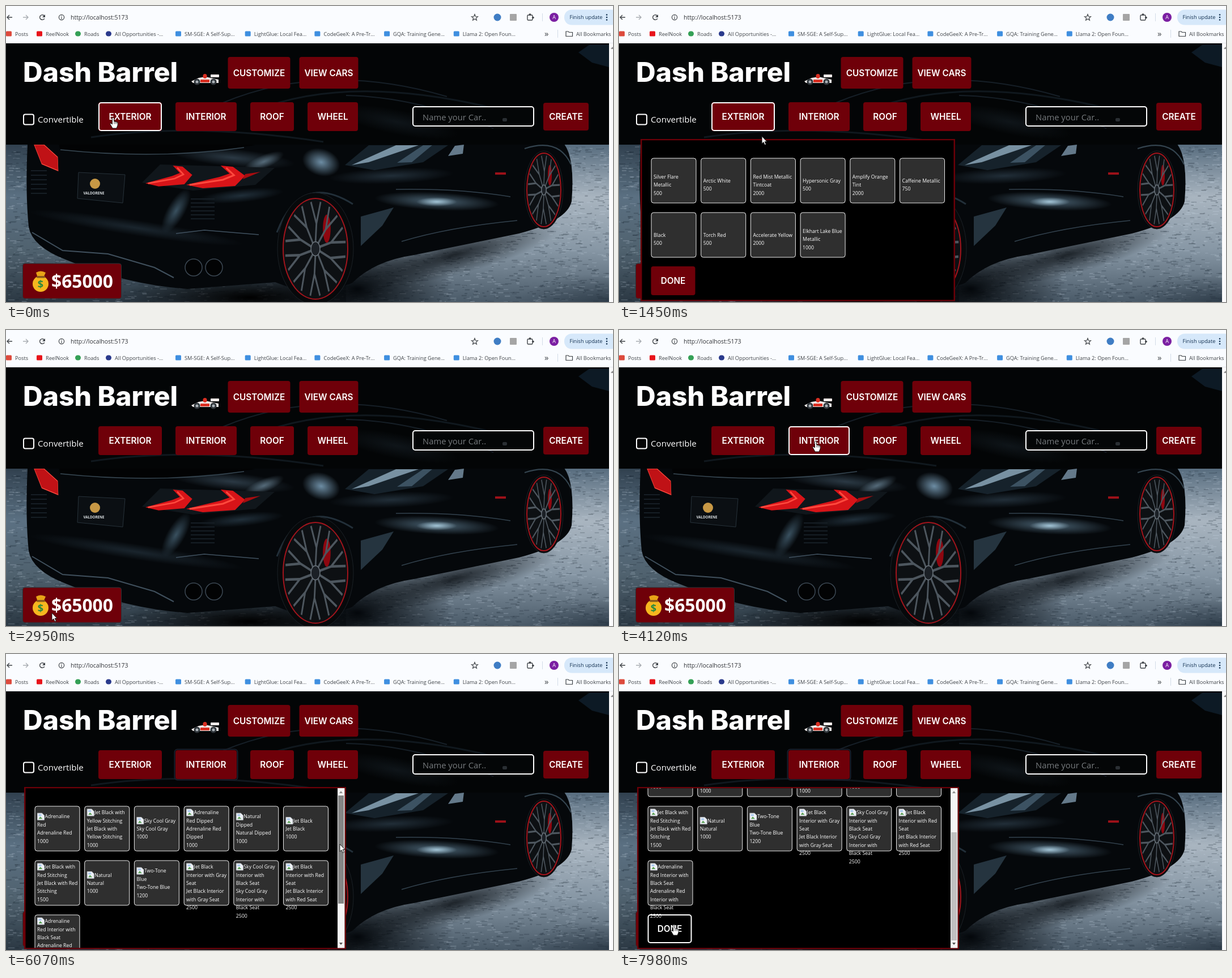
Write an HTML page with a canvas that moves like this. It is 1071x523 px and loops after 8 s.

```html
<!DOCTYPE html>
<html lang="en">
<head>
<meta charset="utf-8">
<title>Car customizer</title>
<style>
html, body { margin: 0; width: 100%; height: 100%; overflow: hidden; background: #000; }
canvas { display: block; width: 1071px; height: 523px; }
</style>
</head>
<body>
<canvas id="stage" width="1071" height="523"></canvas>
<script>
const W = 1071, H = 523, LOOP = 8000, STEP = 120;
const RED = '#6f0009', INK = '#3f4347';
const UI = '"Open Sans", "Noto Sans", sans-serif';
const HEAD = 'Inter, Roboto, sans-serif';
const stage = document.getElementById('stage').getContext('2d');
let c = stage;

// ---------- drawing helpers ----------
function text(s, x, y, size, color, font = UI, weight = 400, align = 'left') {
  c.font = `${weight} ${size}px ${font}`;
  c.fillStyle = color;
  c.textAlign = align;
  c.fillText(s, x, y);
}
function paint(fill, stroke, lw) {
  if (fill) { c.fillStyle = fill; c.fill(); }
  if (stroke) { c.strokeStyle = stroke; c.lineWidth = lw; c.stroke(); }
}
function box(x, y, w, h, r, fill, stroke, lw = 1) {
  c.beginPath(); c.roundRect(x, y, w, h, r); paint(fill, stroke, lw);
}
function disc(x, y, rx, ry, fill, stroke, lw = 1) {
  c.beginPath(); c.ellipse(x, y, rx, ry, 0, 0, 7); paint(fill, stroke, lw);
}
function shape(path, fill, stroke, lw = 1) {
  const p = new Path2D(path);
  if (fill) { c.fillStyle = fill; c.fill(p); }
  if (stroke) { c.strokeStyle = stroke; c.lineWidth = lw; c.stroke(p); }
}
function glow(x, y, rx, ry, rgb, a, turn = 0) {
  c.save();
  c.translate(x, y); c.rotate(turn); c.scale(rx, ry);
  const g = c.createRadialGradient(0, 0, 0, 0, 0, 1);
  g.addColorStop(0, `rgba(${rgb},${a})`);
  g.addColorStop(1, `rgba(${rgb},0)`);
  c.fillStyle = g;
  c.fillRect(-1, -1, 2, 2);
  c.restore();
}
function ramp(x0, y0, x1, y1, ...colors) {
  const g = c.createLinearGradient(x0, y0, x1, y1);
  colors.forEach((k, i) => g.addColorStop(i / (colors.length - 1), k));
  return g;
}
function at(x, y, sx, sy, fn) {
  c.save(); c.translate(x, y); c.scale(sx, sy); fn(); c.restore();
}

// ---------- background photo ----------
function floor() {
  c.fillStyle = ramp(0, 245, 0, 523, '#31414f', '#5b7082', '#50626f', '#2b3843');
  c.fillRect(0, 66, 600, 457);
  c.fillStyle = ramp(0, 245, 0, 523, '#586d7f', '#a9b5c0', '#8797a5', '#4a5a68');
  c.fillRect(600, 66, 464, 457);
  let seed = 77;
  const rnd = () => (seed = seed * 16807 % 2147483647) / 2147483647;
  for (let i = 0; i < 4500; i++) {
    c.fillStyle = rnd() < .55 ? 'rgba(22,34,46,.25)' : 'rgba(200,214,226,.22)';
    c.fillRect(rnd() * 1064, 248 + rnd() * 275, 2 + rnd() * 10, 1 + rnd() * 1.2);
  }
  glow(620, 500, 170, 90, '4,8,12', 1);
  glow(790, 440, 190, 36, '4,8,12', .8, -.25);
  glow(430, 515, 230, 45, '0,0,0', 1);
  glow(1064, 523, 160, 50, '20,32,44', .5);
}
function wheel(x, y, rx, ry, tyre) {
  disc(x, y, rx + tyre, ry + tyre, '#07090b', '#1b2126');
  disc(x, y, rx, ry, '#0d1013', '#a3141c', 2);
  disc(x + rx * .35, y - ry * .4, rx * .12, ry * .28, '#8e0710');
  at(x, y, rx, ry, () => {
    for (let i = 0; i < 10; i++) {
      c.rotate(Math.PI / 5);
      shape('M0 -.1 L.03 -.5 L-.14 -.93 M.03 -.5 L.16 -.93', null, '#4d565e', .05);
    }
  });
  disc(x, y, rx * .14, ry * .14, '#1b2026', '#6b747c', 1.5);
}
// one hooked tail lamp, drawn in a 100 x 40 cell
function lamp(x, y, sx, sy) {
  at(x, y, sx, sy, () => {
    shape('M0 34 L60 20 L78 14 L62 0 L84 2 L106 18 L88 36 L30 40 Z', '#d81418');
    shape('M6 34 L66 25 L86 17 L72 4', null, '#ff4a3e', 3);
  });
}
function car() {
  shape(`M38 245 Q34 330 40 390 Q46 425 105 448 Q210 492 320 500 L475 488 L540 512 L610 490
    Q650 450 720 440 L905 402 Q990 380 998 345 Q1004 270 985 244 Q900 150 700 130 Q380 140 90 220 Z`, '#05080b');
  // light along deck, fender and bumper
  glow(400, 268, 110, 16, '80,105,124', .5, .1);
  glow(455, 275, 38, 12, '125,155,175', .6, -.4);
  glow(556, 276, 34, 24, '120,155,180', .9, .3);
  glow(300, 362, 44, 16, '70,98,116', .8, -1.05);
  glow(415, 335, 75, 12, '50,72,88', .6, -.1);
  glow(230, 392, 190, 14, '40,56,68', .6, .15);
  shape('M92 236 Q260 222 440 246 Q260 272 95 252 Z', '#020304');
  shape('M96 254 Q270 272 420 250', null, '#384853', 1.5);
  shape('M46 400 L100 432 L180 438 L262 462 L296 480', null, '#40505d', 2);
  shape('M300 402 L350 396 L446 404', null, '#40515f', 1.5);
  for (let i = 0; i < 6; i++) {
    c.fillStyle = '#161e25';
    c.fillRect(326, 340 + i * 7, 42, 2);
    c.fillRect(44, 290 + i * 8, 28, 2);
  }
  for (const x of [331, 367]) disc(x, 462, 15, 15, '#020304', '#3c4853', 1.5);
  shape('M240 312 L272 280 L474 286 L440 316 L330 326 Z', '#10161b');
  lamp(246, 282, .78, .92);
  lamp(318, 282, .98, 1);
  shape('M418 306 L422 297 L449 293 Z', '#a60d10');
  at(47, 245, .45, 1, () => shape('M6 0 L44 0 L98 22 L100 46 L36 34 Z', '#c01216', '#ff4a3e', 1.5));
  // plate
  shape('M128 294 L210 298 L206 348 L126 340 Z', '#0b0f13', '#27323a');
  disc(157, 314, 9, 9, '#c79845');
  text('VALDORENE', 155, 333, 6.2, '#d8dde0', UI, 700, 'center');
  // windows and flank
  shape('M598 281 L640 246 L780 246 L736 276 L650 290 Z', '#16222b');
  shape('M610 281 L688 246 L728 246 L640 276 Z', '#7891a2');
  shape('M690 277 L736 246 L752 246 L716 276 Z', '#3c5262');
  shape('M780 265 L792 247 L808 245 L806 261 Z', '#64798a');
  glow(680, 300, 110, 14, '48,66,80', .65, -.04);
  shape('M626 372 L684 356 L664 388 L626 424 Z', '#25343f');
  glow(760, 345, 110, 16, '90,120,140', .8, .05);
  glow(760, 346, 36, 8, '185,220,238', .8);
  shape('M688 324 Q800 322 890 337 M698 416 Q780 391 902 379', null, '#33424e', 1.5);
  c.fillStyle = '#9c1119'; c.fillRect(863, 294, 19, 4);
  shape('M915 252 Q975 232 997 280', null, '#34444f', 2);
  shape('M478 400 Q520 292 612 350', null, '#222f39', 3);
  wheel(546, 429, 57, 89, 10);
  wheel(949, 325, 30, 65, 4);
}
function photo() {
  c.save();
  c.beginPath(); c.rect(0, 66, 1064, 457); c.clip();
  floor();
  car();
  c.fillStyle = '#030506';
  c.fillRect(0, 66, 1064, 179);
  // roof line showing faintly through the header
  shape('M1010 82 L1030 68 H1064 V108 L1034 100 Z', '#0d1a25');
  shape('M380 172 Q560 96 778 160 M600 158 Q720 160 860 216', null, '#161f27', 2);
  shape('M440 185 Q600 120 850 178 M150 232 Q330 205 560 240', null, '#10181e', 3);
  glow(690, 205, 110, 22, '26,36,44', .5, .2);
  c.restore();
}

// ---------- browser frame ----------
function tab(s, x, color, round) {
  box(x, 44.5, 10, 9, round ? 5 : 1.5, color);
  text(s, x + 16, 52.5, 9.2, INK);
}
function chrome() {
  c.fillStyle = '#fafcff'; c.fillRect(0, 0, W, 66);
  c.fillStyle = '#e4e8ee'; c.fillRect(0, 65, W, 1);
  c.fillStyle = '#fbfbfc'; c.fillRect(1064, 66, 7, 457);
  shape('M1067 76 H1073 L1070 72 Z', '#8a8a8a');
  shape('M11 20 H2 M6 16 L2 20 L6 24', null, INK, 1.4);
  shape('M30 20 H39 M35 16 L39 20 L35 24', null, '#a9adb2', 1.4);
  c.beginPath(); c.arc(64, 20, 4.3, .5, 5.6); paint(null, INK, 1.5);
  shape('M69 15 V20 H64 Z', INK);
  disc(98, 20, 4.6, 4.6, null, INK, 1.2);
  shape('M98 19.5 V23 M98 17 V18.3', null, INK, 1.2);
  text('http://localhost:5173', 114, 24, 10.5, '#303236');
  c.beginPath();
  for (let i = 0; i < 10; i++) {
    const r = i % 2 ? 2.5 : 5.8, a = i * Math.PI / 5 - Math.PI / 2;
    c.lineTo(827 + r * Math.cos(a), 20.5 + r * Math.sin(a));
  }
  c.closePath(); paint(null, INK, 1.2);
  disc(867, 20, 6.5, 6.5, '#3f7dc4');
  box(889, 14, 12, 12, 1, '#a5a5a5');
  box(920, 16, 9, 9, 1.5, null, INK, 1.4);
  disc(924.5, 15, 1.8, 1.8, INK); disc(930, 20.5, 1.8, 1.8, INK);
  c.fillStyle = '#d3dce8'; c.fillRect(946, 13, 1, 14); c.fillRect(973, 42, 1, 14);
  disc(967, 20, 8, 8, '#7b1fa2');
  text('A', 967, 23.3, 9, '#fff', UI, 400, 'center');
  box(985, 6.5, 96, 27, 13, '#d6e8fa');
  text('Finish update', 994.5, 23.3, 9.2, '#123050');
  for (let i = -1; i < 2; i++) disc(1060, 20 + i * 4.5, 1.3, 1.3, '#123050');

  tab('Posts', 0, '#dd4a3c');
  tab('ReelNook', 54, '#e8131a');
  tab('Roads', 122, '#34a056', true);
  tab('All Opportunities -...', 176, '#2a3a8c', true);
  ['SM-SGE: A Self-Sup...', 'LightGlue: Local Fea...', 'CodeGeeX: A Pre-Tr...',
    'GQA: Training Gene...', 'Llama 2: Open Foun...']
    .forEach((s, i) => tab(s, 299 + i * 122.7, '#3f8fe0'));
  text('»', 950, 54, 15, INK);
  shape('M988 53.5 V45 H992 L993.5 46.5 H999.5 V53.5 Z', null, INK, 1.2);
  text('All Bookmarks', 1006, 52.5, 9.2, INK);
}

// ---------- page ----------
function button(label, [x, y, w, h], hover = false, focus = false) {
  if (focus && !hover) box(x - 1.5, y - 1.5, w + 3, h + 3, 5, null, '#1b1f2c', 2);
  box(x, y, w, h, 4, hover && !focus ? '#000' : RED);
  if (hover) box(x + 1, y + 1, w - 2, h - 2, 4, null, '#fff', 2);
  text(label, x + w / 2, y + h / 2 + 5.5, 15.3, '#fff', HEAD, 600, 'center');
}
function raceCar() {
  shape('M327 133 L340 127 L352 125 L375 130 V136 H330 Z', '#efeae8');
  box(361, 121, 15, 5, 1, '#efeae8');
  box(343, 130, 16, 5, 1, '#d92f22');
  disc(351, 124, 3.6, 4, '#d92f22');
  for (const x of [337, 366]) {
    disc(x, 134, 5.5, 5.5, '#30363b');
    disc(x, 134, 2.5, 2.5, '#a9b0b5');
  }
}
function moneyBag() {
  shape('M53 471 Q61 466 70 471 L66 480 H56 Z', '#e8a317');
  disc(61, 491, 14, 14, '#f6b71f');
  box(54, 477, 15, 3.5, 1.5, '#8a5a1c');
  text('$', 61, 497.5, 18, '#2b8a3e', UI, 700, 'center');
}
function page() {
  text('Dash Barrel', 30, 134, 48, '#fff', HEAD, 800);
  raceCar();
  button('CUSTOMIZE', [391.5, 90, 110, 56]);
  button('VIEW CARS', [517.5, 90, 104, 56]);
  button('ROOF', [431, 170, 77, 51]);
  button('WHEEL', [532, 170, 89, 51]);
  button('CREATE', [948, 171, 80, 49]);
  box(31, 191.5, 18, 18, 3, '#050505', '#fff', 2);
  text('Convertible', 56, 205.5, 15.1, '#fff');
  box(718, 178, 213, 34, 4, '#040607', '#fff', 2);
  box(876, 198, 8, 6, 2, '#2a2f33');
  text('Name your Car..', 735, 201.5, 14.8, '#777b7e');
  box(29.5, 455, 174, 62, 4, RED, '#2c3338');
  moneyBag();
  text('$65000', 80, 497.5, 31.8, '#fff', UI, 700);
}

const backdrop = document.createElement('canvas');
backdrop.width = W; backdrop.height = H;
function paintBackdrop() {
  c = backdrop.getContext('2d');
  photo(); chrome(); page();
  c = stage;
}

// ---------- option panels ----------
const paints = ['Silver Flare Metallic 500', 'Arctic White 500', 'Red Mist Metallic Tintcoat 2000',
  'Hypersonic Gray 500', 'Amplify Orange Tint 2000', 'Caffeine Metallic 750', 'Black 500',
  'Torch Red 500', 'Accelerate Yellow 2000', 'Elkhart Lake Blue Metallic 1000'];
const seats = ['Adrenaline Red 1000', 'Jet Black with Yellow Stitching 1000', 'Sky Cool Gray 1000',
  'Adrenaline Red Dipped 1000', 'Natural Dipped 1000', 'Jet Black 1000',
  'Jet Black with Red Stitching 1500', 'Natural 1000', 'Two-Tone Blue 1200',
  'Jet Black Interior with Gray Seat 2500', 'Sky Cool Gray Interior with Black Seat 2500',
  'Jet Black Interior with Red Seat 2500', 'Adrenaline Red Interior with Black Seat 2500'];
const paintFails = i => 2420 + STEP * Math.floor(i / 3);
const seatFails = i => !i ? 5000 : i > 8 ? 5250 : i % 2 ? 5680 : 5410;

function wrap(words, indent) {
  c.font = `8.7px ${UI}`;
  const lines = [];
  let row = '';
  for (const w of words) {
    const next = row ? row + ' ' + w : w;
    if (row && c.measureText(next).width + (lines.length ? 0 : indent) > 72) {
      lines.push(row);
      row = w;
    } else row = next;
  }
  return [...lines, row];
}
function brokenImage(x, y) {
  shape(`M${x} ${y} h8 l4 4 v8 h-12 Z`, '#eef1f5', '#b9bec4');
  shape(`M${x + 2} ${y + 10} l3 -4 l4 4 Z`, '#5aa055');
  c.fillStyle = '#a9c8ee'; c.fillRect(x + 2, y + 2, 5, 3);
}
function card(label, x, y, labelled, broken) {
  box(x + .5, y + .5, 79, 79, 4, '#2f2f2f', '#ececec');
  if (!labelled) return;
  const words = label.split(' '), price = words.pop(), indent = broken ? 13.5 : 0, pitch = 14.4;
  const lines = [...(broken ? wrap(words, indent) : ['']), ...wrap(words, 0), price];
  const first = y + 40.3 - pitch * Math.min(2, (lines.length - 1) / 2);
  if (broken) brokenImage(x + 5, first - 6);
  lines.forEach((s, i) => text(s, x + 4.5 + (i ? 0 : indent), first + i * pitch + 3.2, 8.7, '#fff'));
}
function panel(items, x, w, t, o) {
  c.fillStyle = '#6c0008'; c.fillRect(x, 235, w, 286.5);
  c.save();
  c.beginPath(); c.rect(x + 2.5, 237.3, w - 5, 282); c.clip();
  c.fillStyle = '#000'; c.fillRect(x, 235, w, 286);
  const left = x + 18.5, top = 268.5 - o.scroll;
  const done = [left, top + Math.ceil(items.length / 6) * 96 - .5, 78, 51];
  button('DONE', done, inside(done, pointerAt(t - STEP)));
  items.forEach((s, i) =>
    card(s, left + (i % 6) * 87.7, top + Math.floor(i / 6) * 96, t >= o.labelAt, t >= o.fails(i)));
  c.restore();
}
function scrollbar(scroll, color) {
  c.fillStyle = '#f5f5f5'; c.fillRect(585, 237, 12.5, 282.5);
  c.fillStyle = color; c.fillRect(586, 250 + scroll * 65 / 96, 10, 191);
  shape('M588 246 h6 l-3 -4 Z', '#8c8c8c');
  shape('M588 510 h6 l-3 4 Z', '#505050');
}

// ---------- pointer: each glide is start, end, x, y ----------
const glides = [
  [1300, 1690, 394, 305], [1690, 2300, 81, 500], [2950, 3600, 347, 196], [4880, 5120, 222, 377],
  [5250, 5800, 589, 336], [6590, 6830, 598, 401], [7360, 7740, 97, 478]
];
function pointerAt(t) {
  let x = 189, y = 197;
  for (const [a, b, gx, gy] of glides) {
    if (t < a) break;
    const k = t >= b ? 1 : Math.floor((t - a) / STEP) * STEP / (b - a);
    x += (gx - x) * k;
    y += (gy - y) * k;
  }
  return [x, y];
}
const inside = ([x, y, w, h], [px, py]) => px >= x && px <= x + w && py >= y && py <= y + h;

function pointer([x, y], hand) {
  at(x, y, 1, 1, () => {
    c.lineJoin = 'round';
    shape(hand
      ? 'M-1.5 1 Q0 -1 1.5 1 V7 L7 8 Q9 9 8 14 L6 19 H-1 L-5.5 11 L-4 10 L-1.5 12 Z'
      : 'M0 0 V13 L3 10.3 L5.2 15.2 L7.3 14.3 L5.2 9.5 H9 Z', '#fff', '#111', .9);
    if (hand) shape('M1.7 8 v3.5 M4 8 v3.5 M6.2 8 v3.5', null, '#222', .7);
  });
}

// ---------- timeline ----------
const EXTERIOR = [163, 170, 112, 51], INTERIOR = [299, 170, 108, 51];

function draw(t) {
  const tip = pointerAt(t), late = pointerAt(t - STEP);
  const paintOpen = t >= 390 && t < 2950, seatOpen = t >= 4240;
  c.drawImage(backdrop, 0, 0);
  button('EXTERIOR', EXTERIOR, inside(EXTERIOR, late), t < 2950);
  button('INTERIOR', INTERIOR, inside(INTERIOR, late), t >= 4000);
  if (paintOpen) panel(paints, 38, 555, t, { scroll: 0, labelAt: 780, fails: paintFails });
  if (seatOpen) {
    const scroll = Math.max(0, Math.min(96, 32 * (1 + Math.floor((t - 6590) / STEP))));
    panel(seats, 32, 568, t, { scroll, labelAt: 4390, fails: seatFails });
    scrollbar(scroll, t >= 5950 && t < 7360 ? '#858585' : '#c1c1c1');
  }
  const overDone = (paintOpen || t > 7600) && inside([50, 460, 85, 51], tip);
  pointer(tip, overDone || inside(EXTERIOR, tip) || inside(INTERIOR, tip));
}

paintBackdrop();
const start = performance.now();
function tick(now) {
  draw(Math.max(0, now - start) % LOOP);
  requestAnimationFrame(tick);
}
draw(0);
requestAnimationFrame(tick);
</script>
</body>
</html>
```
